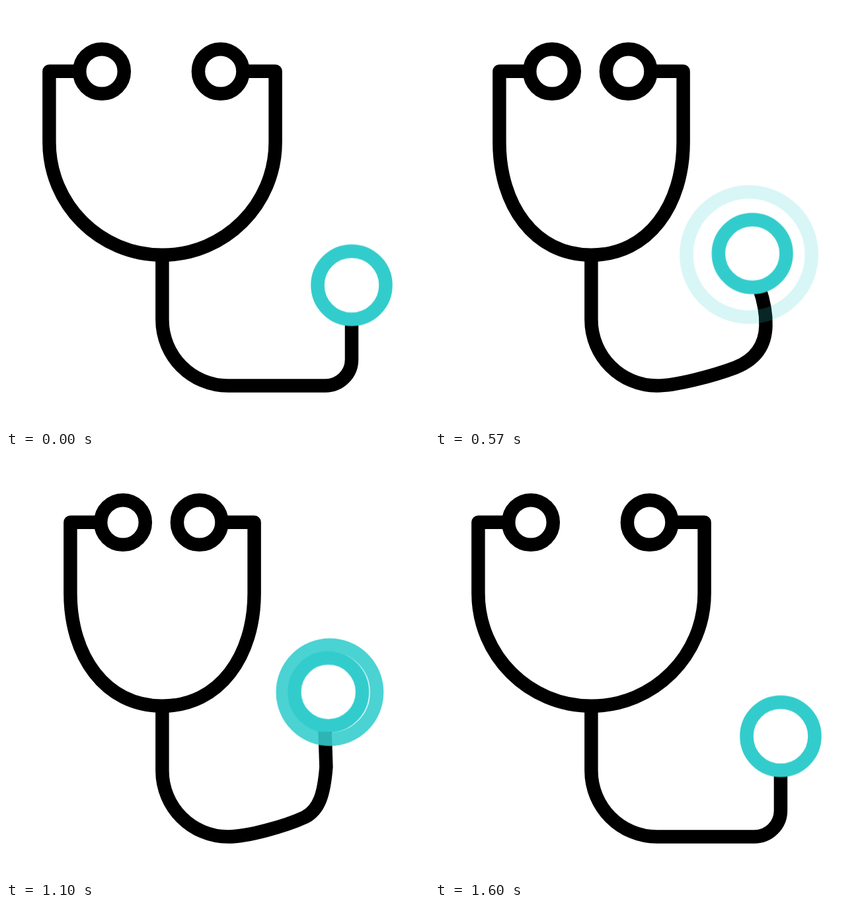
These frames come from a looping animation (640x640 px, 1670 ms). An HTML page without scripts:

```html
<!DOCTYPE html>
<html lang="en">
<head>
<meta charset="utf-8">
<title>Stethoscope</title>
<style>
  html, body { margin: 0; width: 100%; height: 100%; overflow: hidden; background: #fff; }
  svg { display: block; width: 100%; height: 100%; fill: none; stroke: #000; stroke-width: 20.5; stroke-linejoin: round; }

  svg * { animation: 1670ms cubic-bezier(.333, 0, .667, 1) infinite; }

  /* Poses of the chest piece */
  svg {
    --rest: translate(523px, 422.5px);
    --tap-low: translate(467px, 378.5px);
    --lift: translate(523px, 361.4px);
    --tap-high: translate(482.4px, 354.5px);
  }

  .ear { animation-name: squeeze; }
  .left { --dx: 32px; }
  .right { --dx: -32px; }
  .yoke { animation-name: yoke; }
  .tube { animation-name: tube; }
  .chest, .pulse { stroke: #3cc; transform: var(--rest); }
  .chest { animation-name: chest; }
  .pulse {
    animation-name: follow, ripple;
    animation-timing-function: cubic-bezier(.333, 0, .667, 1), linear;
  }

  @keyframes squeeze {
    0%, 7.6%, 96%, 100% { transform: none; }
    26%, 75.4% { transform: translateX(var(--dx)); }
  }

  @keyframes yoke {
    0%, 7.6%, 96%, 100% {
      d: path("M111 98.8H65.4V206C65.4 300.4 142 376.8 236.5 376.8C331 376.8 407.6 300.4 407.6 206V98.8H359");
    }
    26%, 75.4% {
      d: path("M143 98.8H97.4V206C97.4 300.4 149.6 376.8 236.5 376.8C323.4 376.8 375.6 300.4 375.6 206V98.8H327");
    }
  }

  @keyframes tube {
    0%, 10%, 96%, 100% {
      d: path("M236.4 376V474.5C236.4 529.7 281 574.5 336 574.5C336 574.5 483 574.5 483 574.5C505 574.5 523 557 523 535C523 518 523 500 523 476");
    }
    26% {
      d: path("M236.4 376V474.5C236.4 529.7 281 574.5 336 574.5C362 574.5 420 560 457 548C485 539 497 520 496.5 490C496.5 472 492 452 482 430");
    }
    52% {
      d: path("M236.4 376V474.5C236.4 529.7 281 574.5 336 574.5C370 574.5 420 560 449 543C485 521 509 494 513.5 464C516 443 516 430 518 414");
    }
    70% {
      d: path("M236.4 376V474.5C236.4 529.7 281 574.5 336 574.5C365 574.5 424 558 452.4 545.3C472.4 536 477 512 480 469.7C479 449 478 428 477 407");
    }
  }

  @keyframes chest {
    0%, 10%, 96%, 100% { transform: var(--rest); r: 51.5px; }
    26% { transform: var(--tap-low); r: 51.5px; }
    52% { transform: var(--lift); r: 50.7px; }
    70% { transform: var(--tap-high); r: 51.5px; }
  }

  /* The pulse runs slightly out of step with the chest piece */
  @keyframes follow {
    0%, 6%, 96%, 100% { transform: var(--rest); }
    28.6% { transform: var(--tap-low); }
    52% { transform: var(--lift); }
    71.2% { transform: var(--tap-high); }
  }

  @keyframes ripple {
    0%, 7.99% { r: 51.5px; opacity: 0; }
    8% { r: 51.5px; opacity: 1; }
    17.6% { opacity: 1; }
    38% { r: 101px; opacity: 0; }
    53.99% { r: 51.5px; opacity: 0; }
    54% { r: 51.5px; opacity: 1; }
    63.6% { opacity: 1; }
    84% { r: 101px; opacity: 0; }
    100% { r: 51.5px; opacity: 0; }
  }
</style>
</head>
<body>
<svg viewBox="0 0 640 640">
  <path class="yoke" d="M111 98.8H65.4V206C65.4 300.4 142 376.8 236.5 376.8C331 376.8 407.6 300.4 407.6 206V98.8H359"/>
  <circle class="ear left" cx="145" cy="99" r="33.8"/>
  <circle class="ear right" cx="324.7" cy="99" r="33.8"/>
  <path class="tube" d="M236.4 376V474.5C236.4 529.7 281 574.5 336 574.5C336 574.5 483 574.5 483 574.5C505 574.5 523 557 523 535C523 518 523 500 523 476"/>
  <circle class="chest" r="51.5"/>
  <circle class="pulse" r="51.5"/>
</svg>
</body>
</html>
```
